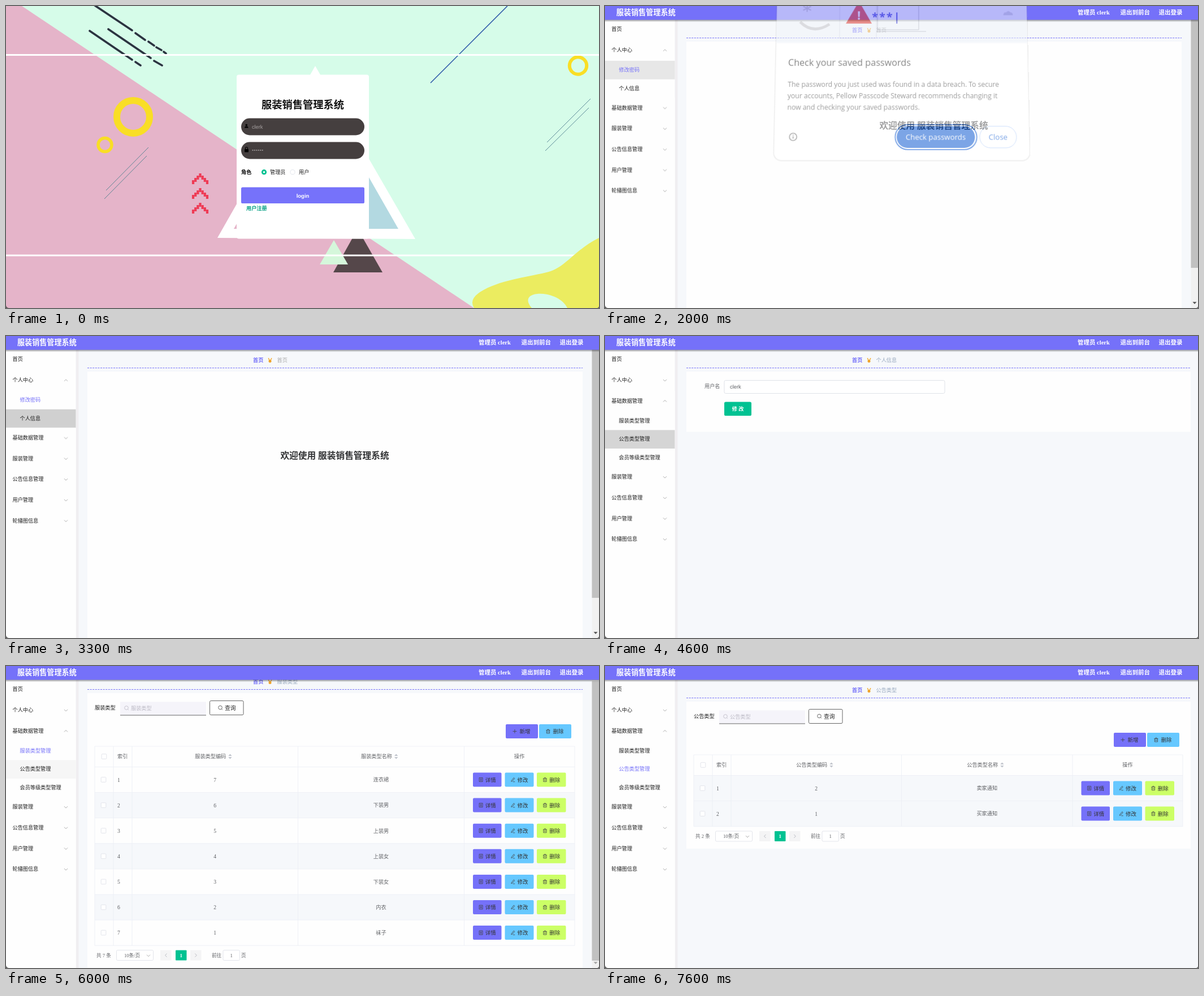
An HTML page that plays this animation: 1049 px wide and 534 px high, repeating every 8000 ms.

```html
<!DOCTYPE html>
<html lang="zh-CN">
<head>
<meta charset="utf-8">
<title>服装销售管理系统</title>
<style>
  html, body { margin: 0; width: 100%; height: 100%; overflow: hidden; background: #fff; }
  #frame { position: relative; width: 100%; height: 100%; overflow: hidden; contain: strict; }
  svg { position: absolute; left: 0; top: 0; width: 1049px; height: 534px; }
  #stage { font-family: "Liberation Serif", "Noto Sans CJK SC", "Noto Sans CJK", serif; }
  #login, .sans { font-family: "Liberation Sans", "Noto Sans CJK SC", "Noto Sans CJK", sans-serif; }
  #dialog { font-family: "Open Sans", "Noto Sans", sans-serif; transform-origin: 525px 50px; overflow: visible; }
  .chev { transform-box: fill-box; transform-origin: center; }
  text { white-space: pre; }
</style>
</head>
<body>
<div id="frame">
  <svg id="stage" viewBox="0 0 1049 534"></svg>
  <svg id="dialog" viewBox="0 0 1049 534"></svg>
</div>
<script>
const LOOP = 8000;
const INK = '#1c1c1c', VIOLET = '#7571f9', SKY = '#66c8ff', LIME = '#ccff66', GREEN = '#00c292', GREY = '#606266';
const USER = 'clerk';

// Drawing helpers; y of a text is its visual middle.
const text = (x, y, s, size = 9.17, fill = INK, extra = '') =>
  `<text x="${x}" y="${y + size * .37}" font-size="${size}" fill="${fill}" ${extra}>${s}</text>`;
const MID = ' text-anchor="middle"', BOLD = ' font-weight="700"', MEDIUM = ' font-weight="500"';
const rect = (x, y, w, h, fill, extra = '') =>
  `<rect x="${x}" y="${y}" width="${w}" height="${h}" fill="${fill}" ${extra}/>`;
const line = (d, stroke, width = 1, extra = '') =>
  `<path d="${d}" fill="none" stroke="${stroke}" stroke-width="${width}" ${extra}/>`;
const shape = (d, fill) => `<path d="${d}" fill="${fill}"/>`;
const disc = (x, y, r, fill, extra = '') => `<circle cx="${x}" cy="${y}" r="${r}" fill="${fill}" ${extra}/>`;
const ring = (x, y, r, stroke, width) => disc(x, y, r, 'none', `stroke="${stroke}" stroke-width="${width}"`);
const group = (id, body) => `<g id="${id}">${body}</g>`;
const chevron = (x, y, id = '') =>
  line(`M${x - 3} ${y - 1.4}l3 3 3-3`, '#999', .8, `class="chev" ${id && `id="${id}"`}`);

const ICONS = {
  plus: 'M-3.5 0h7M0-3.5v7',
  view: 'M-3-3.5h6v7h-6zM-1.5-1.5h3M-1.5 0h3M-1.5 1.5h3',
  edit: 'M-2.5 1.5l4-5 1.5 1.3-4 4.8-2 .6zM0 3.7h3.5',
  trash: 'M-3.5-2h7M-1.2-2v-1.4h2.4v1.4M-2.6-2v5.5h5.2v-5.5M-.9-.3v2.2M.9-.3v2.2',
  find: 'M2.6 2.6l1.4 1.4M3.3 0a3.3 3.3 0 1 1-6.6 0a3.3 3.3 0 1 1 6.6 0'
};
const icon = (name, x, y, stroke = '#444') =>
  line(ICONS[name], stroke, .8, `transform="translate(${x} ${y})"`);

function login() {
  const dashes = 'M157-1L223 43M229 48l17 12M252 63l10 7M266 73l9 5M279 81l4 3' +
    'M181 41l75 51M262 97l14 8M148 44l75 51M229 99l9 6';
  const thin = 'M1034 164l-77 77M1031 180l-77 76M252 250l-75 76M249 265l-75 76';
  let arrows = '';
  for (const top of [296, 322, 348])
    for (let i = -3; i <= 3; i++)
      arrows += rect(341.4 + i * 4.15, top + Math.abs(i) * 4, 4.2, 7, '#ee3b55');
  let dots = '';
  for (let i = 0; i < 6; i++) dots += disc(436.6 + i * 3.4, 255, 1.1, '#a6a1a1');

  return rect(0, 0, 1049, 534, '#d6fce9') +
    shape('M0 0H28L828 534H0z', '#e5b4c9') +
    line(dashes, '#2b3340', 3.6, 'stroke-linecap="round"') +
    line('M887 0L751 136', '#2350a5', 1.5) + line(thin, '#4f7f8e', .9) +
    ring(225, 196, 29, '#f9de25', 12) + ring(175, 245.5, 12, '#f9de25', 5.5) +
    ring(1012, 105.5, 15.2, '#f9de25', 6) + arrows +
    shape('M622 394L666 471H579z', '#55474a') + shape('M580 414L605 457H555z', '#d5f7db') +
    rect(0, 85, 1049, 3, '#fff') + rect(0, 439.5, 1049, 3, '#fff') +
    shape('M547 106L374 410L724 412z', '#fff') +
    shape('M403 394L590 212L694 394z', '#b3d9e1') + shape('M403 394L420 364V394z', '#e5b4c9') +
    shape('M1049 410C1005 432 990 462 960 470S880 483 845 502Q817 517 828 534H1049z', '#ebec60') +
    shape('M930 534C920 523 920 511 940 509S985 517 993 534z', '#d6fce9') +
    rect(408, 121.5, 234, 290, '#fff', 'rx="4"') +
    text(525, 174.5, '服装销售管理系统', 18.3, '#111', MID + BOLD) +
    rect(416, 198.5, 218, 30, '#453f3f', 'rx="15"') + rect(416, 240.5, 218, 30, '#453f3f', 'rx="15"') +
    disc(425.3, 210.5, 1.8, '#000') + shape('M422 215.5q0-3 3.3-3t3.3 3z', '#000') +
    rect(422, 253, 7, 5.5, '#000', 'rx=".8"') + line('M423.5 253v-1.5a2 2 0 0 1 4 0v1.5', '#000', 1.1) +
    text(435, 213.5, USER, 9.17, '#a6a1a1') + dots +
    text(416, 293.5, '角色', 9.17, '#111', BOLD) +
    disc(456.5, 293.7, 4.6, GREEN) + disc(456.5, 293.7, 1.7, '#fff') + text(467, 293.5, '管理员') +
    ring(507, 293.7, 4.1, '#dcdfe6', .8) + text(518, 293.5, '用户') +
    rect(416, 320.5, 218, 28.5, '#7672fa', 'rx="2.6"') +
    text(525, 335.3, 'login', 9.5, '#fff', MID + BOLD) +
    text(425, 358, '用户注册', 9.17, '#009f82', BOLD);
}

// Breadcrumb with its dashed rule
const crumbs = (name, right, fill = '#97a8be', id = '') =>
  text(437, 43, '首页', 9.17, VIOLET, BOLD + (id && ` id="${id}"`)) +
  line('M466 43l-1.5-3.5M468 43l1.7-3.5', '#f5ab2c', 1.5, 'stroke-linecap="round"') +
  disc(467, 44.5, 2.5, '#f0a32c') +
  text(479.5, 43, name, 9.17, fill) +
  line(`M144 56.5H${right}`, VIOLET, 1, 'stroke-dasharray="3 1.6"');

const scrollbar = (top, height, arrow, id = '') =>
  rect(1036.5, 0, 12.5, 534, '#f1f1f1') +
  rect(1036.5, top, 12.5, height, '#c1c1c1', id && `id="${id}"`) +
  shape('M1039.5 523.2h7l-3.5 3.8z', arrow);

const home = () => rect(144, 63, 876, 471, '#fefefe') + crumbs('首页', 1020, '#aaa', 'homeCrumb') +
  text(581.5, 211, '欢迎使用 服装销售管理系统', 15.7, '#303133', MID + BOLD) +
  scrollbar(13, 450, '#505050');

const info = () => rect(144, 63, 892, 106.5, '#fefefe') + crumbs('个人信息', 1036) +
  text(176, 89, '用户名', 9.17, GREY) +
  rect(211, 78.5, 390, 23, '#fff', 'rx="2.6" stroke="#dcdfe6" stroke-width=".9"') +
  text(221, 90, USER, 9.4, GREY, 'class="sans"') +
  rect(211, 116.5, 48, 24.5, GREEN, 'rx="2.6"') + text(235, 129, '修 改', 9.17, '#fff', MID + BOLD);

const button = (x, y, w, fill, glyph, label) =>
  rect(x, y - 12.5, w, 25, fill, 'rx="2"') +
  icon(glyph, x + w * .28, y) + text(x + w * .43, y, label, 9.5, '#333');

const box = (x, y) => rect(x - 4.3, y - 4.3, 8.6, 8.6, '#fff', 'rx="1" stroke="#dcdfe6" stroke-width=".8"');

function table(kind, names, wide, shaded) {
  const right = wide ? 1022 : 1006, c1 = wide ? 524.5 : 516.5, c2 = wide ? 827 : 810.5;
  const top = 193.5, pitch = 45.1, count = names.length, bottom = top + pitch * count, py = bottom + 17.3;
  const m1 = (223 + c1) / 2, m2 = (c1 + c2) / 2;
  const head = (m, s) => text(m - 8, 175, s, 9.17, GREY, MID + MEDIUM) +
    shape(`M${m + 23.5} 174h6.4l-3.2-3.4zM${m + 23.5} 176h6.4l-3.2 3.4z`, '#c0c4cc');
  let out = rect(144, 63, right - 130, py - 41, '#fefefe') + crumbs(kind, right + 14) +
    text(157, 89, kind) + rect(202, 78.5, 152, 23.5, '#f5f4fa') + line('M202 102H354', '#666') +
    icon('find', 213, 89, '#bbb9c4') + text(221, 89.5, kind, 9.17, '#bbb9c4') +
    rect(360.5, 76.5, 59.5, 25, '#fff', 'rx="2" stroke="#555" stroke-width=".9"') +
    icon('find', 379, 88.5) + text(387, 89, '查询', 9.8, '#222', MEDIUM) +
    button(right - 122, 130.5, 57, VIOLET, 'plus', '新增') +
    button(right - 63, 130.5, 57, SKY, 'trash', '删除') +
    box(173.5, 175) + text(197, 175, '索引', 9.17, GREY, MEDIUM) +
    head(m1, kind + '编码') + head(m2, kind + '名称') +
    text((c2 + right) / 2, 175, '操作', 9.17, GREY, MID + MEDIUM);
  let grid = `M157 157H${right}M157 ${top}H${right}`;
  names.forEach((name, i) => {
    const y = top + pitch * i, m = y + 22.5;
    if (shaded || i % 2) out += rect(157, y, right - 157, pitch, '#f6f8fb');
    grid += `M157 ${y + pitch}H${right}`;
    out += box(172.5, m) + text(197, m, i + 1, 9.6, GREY) +
      text(m1, m, count - i, 9.6, GREY, MID) + text(m2, m, name, 9.17, GREY, MID) +
      button(c2 + 15.5, m, 50.5, VIOLET, 'view', '详情') +
      button(c2 + 72, m, 51, SKY, 'edit', '修改') +
      button(c2 + 128.5, m, 51.5, LIME, 'trash', '删除');
  });
  for (const x of [157, 190, 223, c1, c2, right]) grid += `M${x} 157V${bottom}`;
  const field = (x, w) => rect(x, py - 9, w, 18, '#fff', 'rx="2" stroke="#dcdfe6" stroke-width=".8"');
  return out + line(grid, '#ebeef5', .8) +
    text(160, py, `共 ${count} 条`, 8.6, GREY) + field(195.5, 65) +
    text(223, py, '10条/页', 8.6, GREY, MID) + chevron(252, py + .5) +
    rect(273, py - 9, 19.5, 18, '#f4f4f5') + line(`M284.5 ${py - 3}l-3 3 3 3`, '#b0b3ba', .9) +
    rect(300, py - 9, 19.5, 18, GREEN, 'rx="1"') + text(309.7, py, '1', 9, '#fff', MID + BOLD) +
    rect(326, py - 9, 19.5, 18, '#f4f4f5') + line(`M334.3 ${py - 3}l3 3-3 3`, '#b0b3ba', .9) +
    text(364, py, '前往', 8.6, GREY) + field(384, 29.5) +
    text(398.7, py, '1', 9, GREY, MID) + text(416, py, '页', 8.6, GREY);
}

// Each later part of the menu covers the submenu above it and slides down to open it.
function sidebar() {
  const rowTop = k => 23.6 + 36.65 * k;
  const row = (k, s, id) => text(11.5, rowTop(k) + 17.5, s) + (k ? chevron(106, rowTop(k) + 18, id) : '');
  const cover = k => rect(0, rowTop(k), 123.5, 540, '#fefefe');
  const sub = (k, items) => items.map(([id, s], i) => {
    const y = rowTop(k) + 32.75 * i;
    return rect(0, y, 123.5, 32.75, '#d0d0d0', `id="${id}Bg"`) +
      text(24.5, y + 15.8, s, 9.17, INK, `id="${id}"`);
  }).join('');
  const tail = cover(3) + row(3, '服装管理') + row(4, '公告信息管理') + row(5, '用户管理') + row(6, '轮播图信息');
  const middle = cover(2) +
    sub(3, [['cloth', '服装类型管理'], ['notice', '公告类型管理'], ['level', '会员等级类型管理']]) +
    row(2, '基础数据管理', 'baseChev') + group('tail', tail);
  return rect(123.5, 24, 5, 510, '#f0eef1') + rect(0, 24, 123.5, 510, '#fefefe') +
    sub(2, [['pass', '修改密码'], ['self', '个人信息']]) +
    row(0, '首页') + row(1, '个人中心', 'selfChev') + group('middle', middle);
}

const header = () =>
  `<linearGradient id="fade" x2="0" y2="1"><stop stop-color="#000" stop-opacity=".42"/>
   <stop offset="1" stop-color="#000" stop-opacity="0"/></linearGradient>` +
  rect(0, 24, 1049, 4.5, 'url(#fade)') + rect(0, 0, 1049, 24.4, VIOLET) +
  text(20, 11.5, '服装销售管理系统', 13.1, '#fff', BOLD) +
  text(836, 11.5, '管理员 ' + USER, 10.5, '#fff', BOLD) +
  text(911.5, 11.5, '退出到前台', 10.5, '#fff', BOLD) +
  text(979.5, 11.5, '退出登录', 10.5, '#fff', BOLD);

function dialog() {
  const blue = '#0b57d0', body = '#474747';
  return rect(302, -80, 446, 357.5, '#000', 'rx="14" opacity=".12"') +
    rect(303.5, -80, 443, 356, '#fff', 'rx="13"') + rect(303.5, -80, 443, 152, '#f1f3fa') +
    line('M345 34Q368 57 397 38', '#c4c4c8', 5) +
    line('M357 2v14M350 6l14 7M364 6l-14 7', '#c4c4c8', 2) +
    line('M415-10V63H480V-10', '#d2d6e2', 1) + line('M482-10V48H555V-10M480 51H568', '#a9aebb', 1) +
    shape('M449-3L472 37H426z', '#dc362e') + text(449, 22, '!', 21, '#fff', MID + BOLD) +
    text(472, 25, '***|', 20, '#3b3fd6', BOLD + ' letter-spacing="2"') +
    shape('M705 22q1-6 5-5 4-5 8 0 4 0 4 5z', '#c9ccd8') +
    text(325, 106, 'Check your saved passwords', 16.1, '#1f1f1f') +
    text(325, 144.5, 'The password you just used was found in a data breach. To secure', 12.05, body) +
    text(325, 164.7, 'your accounts, Pellow Passcode Steward recommends changing it', 12.05, body) +
    text(325, 185, 'now and checking your saved passwords.', 12.05, body) +
    ring(336, 236, 6.4, '#555', 1.4) + line('M336 235v4M336 232.3v1.4', '#555', 1.4) +
    rect(513.5, 214.8, 142, 43, 'none', `rx="21.5" stroke="${blue}" stroke-width="1.8"`) +
    rect(516.2, 217.6, 136, 37.3, blue, 'rx="18.6"') + text(584, 236, 'Check passwords', 13, '#fff', MID) +
    rect(660.5, 217.6, 64, 37.3, '#fff', 'rx="18.6" stroke="#a8c7fa"') + text(692.5, 236, 'Close', 13, blue, MID);
}

const clothes = ['连衣裙', '下装男', '上装男', '上装女', '下装女', '内衣', '袜子'];
const corners = shape('M0 534V529Q.5 533.5 5 534z', '#555') + shape('M1049 534V531Q1048.6 533.6 1046 534z', '#555');
const byId = id => document.getElementById(id);

byId('stage').innerHTML =
  group('login', login()) +
  group('shell', rect(0, 0, 1049, 534, '#f6f8fb') +
    group('home', home()) + group('info', info()) +
    group('clothWide', table('服装类型', clothes, true)) +
    group('clothPage', group('scroller', table('服装类型', clothes, false)) + scrollbar(13, 494, '#a3a3a3', 'thumb')) +
    group('noticePage', table('公告类型', ['卖家通知', '买家通知'], true, true)) +
    sidebar() + header()) +
  corners;
byId('dialog').innerHTML = dialog();

// Table of time, value, time, value ... held until the next step.
function steps(id, prop, table) {
  const frames = [];
  for (let i = 0; i < table.length; i += 2)
    frames.push({ offset: table[i] / LOOP, [prop]: table[i + 1], easing: 'step-end' });
  frames.push({ offset: 1, [prop]: table.at(-1) });
  byId(id).animate(frames, { duration: LOOP, iterations: Infinity });
}
const show = (id, from, to) => steps(id, 'opacity', [0, 0, from, 1, ...(to ? [to, 0] : [])]);
const slide = (id, table) => steps(id, 'transform', table.map((v, i) => i % 2 ? `translateY(${v}px)` : v));

steps('login', 'opacity', [0, 1, 900, 0]);
show('shell', 900);
show('home', 900, 3600);
show('info', 3600, 5100);
show('clothWide', 5100, 5400);
show('clothPage', 5400, 7300);
show('noticePage', 7300);
steps('homeCrumb', 'fill', [0, INK, 1000, VIOLET]);
slide('scroller', [0, 0, 5900, -8, 6000, -15]);
slide('thumb', [0, 0, 5900, 7, 6000, 14]);

slide('middle', [0, 0, 1000, 16, 1100, 42, 1200, 60, 1300, 65.4, 4200, 54, 4300, 28, 4400, 8, 4500, 0]);
slide('tail', [0, 0, 4200, 18, 4300, 56, 4400, 86, 4500, 98]);
steps('selfChev', 'transform', [0, 'scaleY(-1)', 4200, 'none']);
steps('baseChev', 'transform', [0, 'none', 4200, 'scaleY(-1)']);

steps('pass', 'fill', [0, INK, 1900, VIOLET, 3500, INK]);
steps('self', 'fill', [0, INK, 3500, VIOLET]);
steps('cloth', 'fill', [0, INK, 5000, VIOLET, 7200, INK]);
steps('notice', 'fill', [0, INK, 7200, VIOLET]);
steps('passBg', 'opacity', [0, 0, 1200, .5, 1300, 1, 1900, .8, 2000, .5, 2100, .2, 2200, 0]);
steps('selfBg', 'opacity', [0, 0, 3200, .4, 3300, 1, 4100, 0]);
steps('clothBg', 'opacity', [0, 0, 4800, .9, 5700, 0]);
steps('noticeBg', 'opacity', [0, 0, 4500, .4, 4600, .88, 4800, .17, 6700, .5, 6800, .9, 7400, .4, 7500, 0]);
steps('levelBg', 'opacity', [0, 0, 6300, .5, 6400, .9, 6700, 0]);

const tilt = (y, deg) => `translateY(${y}px) perspective(1500px) rotateX(${deg}deg)`;
steps('dialog', 'opacity', [0, 0, 1900, .2, 2000, .54, 2100, .85, 2200, 1, 2900, .8, 3000, .5, 3100, .25, 3200, .08, 3300, 0]);
steps('dialog', 'transform', [0, tilt(-10, 12), 2000, tilt(-6, 7.9), 2100, tilt(-2, 3), 2200, tilt(0, 0)]);
</script>
</body>
</html>
```
